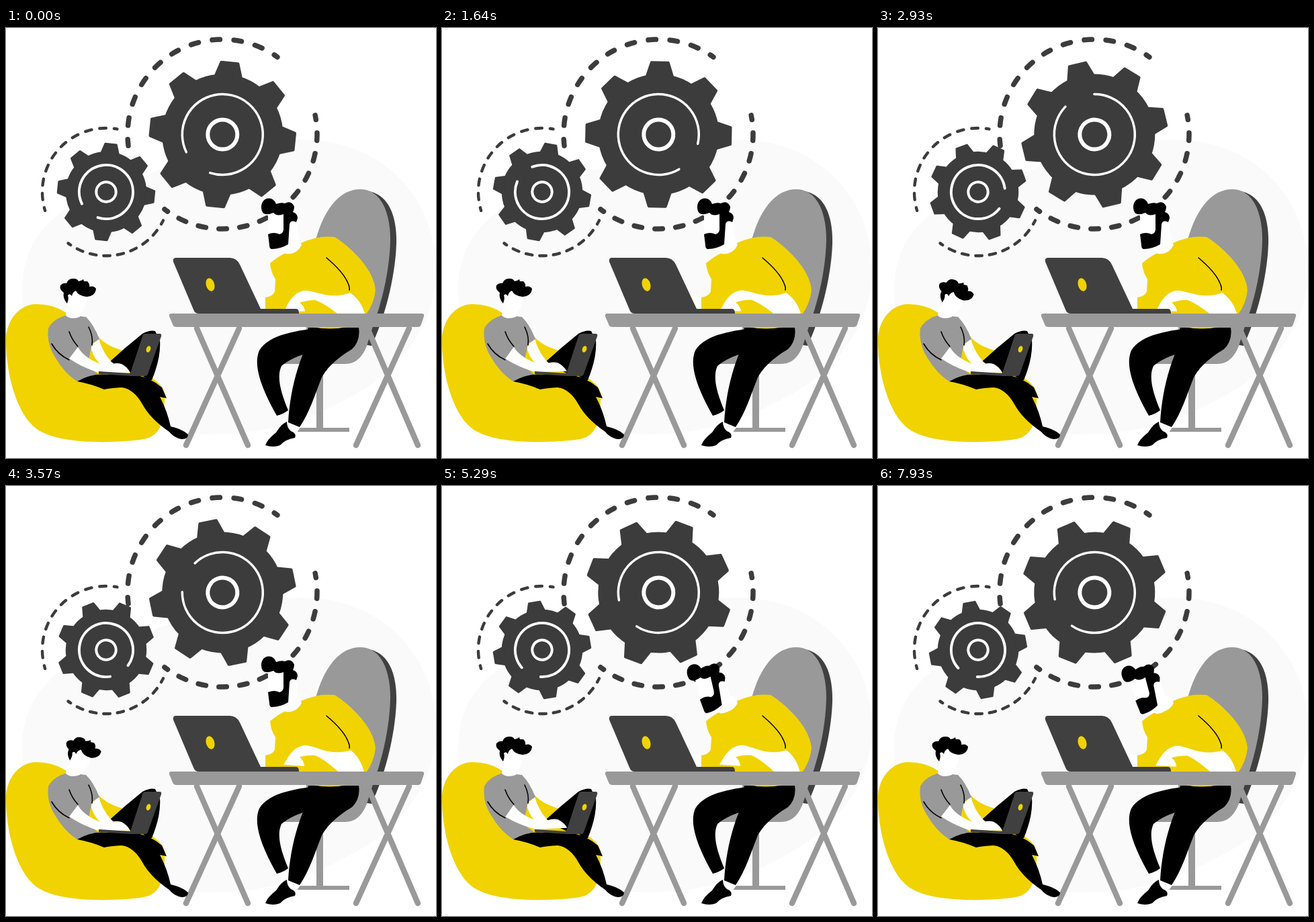
Recreate the animation shown at these times as an HTML page. Size 640x640 px, loop 8000 ms.

```html
<!DOCTYPE html>
<html lang="en">
<head>
<meta charset="utf-8">
<title>Two people at work</title>
<style>
  html, body { margin: 0; height: 100%; overflow: hidden; background: #fff; }
  svg { display: block; width: 100vw; height: 100vh; }
  .dark { fill: #3c3c3c; }
  .panel { fill: #404040; }
  .grey { fill: #999; }
  .yellow { fill: #f1d302; }
  .white { fill: #fff; }
  .line { fill: none; stroke: #000; stroke-width: 1.6; stroke-linecap: round; }
  .ring { fill: none; stroke: #3c3c3c; stroke-linecap: round; }
  .steel { fill: none; stroke: #999; stroke-width: 8.4; stroke-linecap: round; }
</style>
</head>
<body>
<svg viewBox="0 0 640 640">
  <path fill="#fafafa" d="M24 390C24 300 90 252 200 222C300 180 390 160 470 168C570 180 640 260 640 360C640 430 600 500 520 545C440 590 380 605 300 605C150 600 24 500 24 390Z"/>
  <g id="rings"></g>
  <g id="bigGear"></g>
  <g id="smallGear"></g>

  <g id="chair">
    <path class="panel" d="M535 242C570 246 582 280 581 322C579 375 562 435 544 473L526 470Z"/>
    <path class="grey" d="M452 370C458 290 488 240 527 240C560 240 572 278 572 315C571 370 554 430 535 470L455 470Z"/>
    <path class="grey" d="M447 444H546L538 470Q528 500 505 500H412Q420 486 447 484Z"/>
    <path class="steel" style="stroke-width:10;stroke-linecap:butt" d="M467 498V598"/>
    <path class="steel" style="stroke-width:6;stroke-linecap:butt" d="M432 598H511"/>
  </g>

  <g id="deskWorker">
    <path class="white" d="M403 574L420 569L424 590L440 592L432 603L416 596Z"/>
    <path d="M470 446C436 450 392 455 377 480C366 505 385 545 403 577Q412 575 420 569C410 545 402 520 410 503Q425 490 455 482Z"/>
    <path d="M450 446H525Q528 465 515 478C495 490 478 505 470 520C460 545 452 572 437 594L420 587C422 550 430 515 442 485Z"/>
    <path d="M386 621Q389 612 402 602Q410 589 418 586Q418 595 424 600Q433 603 430 610Q416 612 408 621Q398 625 386 621Z"/>
    <path class="white" d="M374 400Q382 399 388 404L392 420H376Z"/>
    <path class="yellow" d="M393 350Q405 340 416 335Q432 336 439 320Q465 308 489 311C506 321 547 355 550 390Q548 410 535 428H386V401Q398 399 400 392L401 374Q394 363 393 350Z"/>
    <path class="yellow" d="M452 444H512Q482 451 452 444Z"/>
    <g id="typingArm">
      <path class="white" d="M417 416Q428 392 446 391C464 392 482 405 512 394Q529 405 535 428H497Q473 409 460 405Q448 405 437 409Q444 414 445 422H414Z"/>
    </g>
    <path class="line" d="M477 342Q503 364 509 380Q512 386 511 390"/>
    <path class="white" d="M414 322Q413 332 416 336Q432 338 440 323L434 312Z"/>
    <g id="workerHead">
      <path class="white" d="M390 275L390 308L400 324L416 334Q430 337 439 322Q434 312 433 284L415 268Z"/>
      <path d="M380 268C379 251 398 249 402 262Q410 259 415 261Q425 256 429 266Q429 270 427 274Q434 276 434 283L432 289Q424 285 422 292L420 322Q408 329 396 329Q392 329 392 323L390 307Q399 303 407 307Q414 306 413 296L413 277Q403 281 398 275Q381 282 380 268Z"/>
    </g>
  </g>

  <g id="desk">
    <path class="steel" d="M284 447L360 621M347 447L268 621M538 447L613 621M600 447L521 621"/>
    <path class="grey" d="M246 425H619Q623 425 622 429L618 441Q617 445 613 445H254Q249 445 248 441L243 429Q242 425 246 425Z"/>
    <path class="panel" d="M253 342H333Q343 342 348 352L379 418H432Q436 418 436 425H287Q281 425 279 419L249 348Q248 342 253 342Z"/>
    <ellipse class="yellow" rx="6.2" ry="10" transform="translate(304 382) rotate(-16)"/>
  </g>

  <g id="loungeWorker">
    <path class="yellow" d="M0 465C0 435 20 411 45 411Q70 411 88 423L137 459Q150 475 182 482L205 515Q240 530 236 552C236 592 226 608 205 612C155 619 68 620 40 592C15 568 0 515 0 465Z"/>
    <path d="M154 497Q178 475 203 455Q214 449 222 451L229 465Q231 490 217 524Q210 525 203 517L186 514L165 504Z"/>
    <path class="white" d="M126 474L138 462Q143 482 157 497L168 506L150 508Q130 495 126 474Z"/>
    <path class="grey" d="M91 427Q70 433 63 447Q60 470 73 490Q87 514 106 526Q125 525 138 516L121 503L128 470L139 463Q131 442 119 430Z"/>
    <path d="M106 526Q128 513 150 516H190Q215 520 232 535L239 551L229 549Q240 570 245 593Q262 597 271 605Q271 612 262 612Q250 610 243 601Q215 582 203 560Q190 537 172 535Q155 536 146 538Q128 530 106 526Z"/>
    <g id="loungeArm">
      <path class="white" d="M94 492L107 475Q118 494 150 503Q162 497 172 500Q181 505 185 513H138Q113 505 94 492Z"/>
    </g>
    <path class="line" d="M68 470Q77 486 94 494M94 452Q98 464 107 474M123 445Q130 459 128 472"/>
    <path class="panel" d="M138 511L185 514L203 459Q204 455 208 455H229Q232 455 231 459L211 515Q209 519 205 518H186L138 515Z"/>
    <ellipse class="yellow" rx="3.2" ry="5" transform="translate(212 478) rotate(18)"/>
    <path class="white" d="M91 416L89 428Q96 435 110 430L108 420Z"/>
    <g id="loungeHead">
      <path class="white" d="M92 396Q93 412 90 424L109 427Q122 415 120 396L104 389Z"/>
      <path d="M86 394Q79 389 81 383Q85 379 90 380Q93 372 101 373Q106 373 108 377Q113 376 115 374L116 377L121 377Q125 381 124 385Q131 383 134 388Q133 399 120 400Q108 399 104 391Q99 393 98 399Q95 394 92 398Q94 402 91 410Q84 402 86 394Z"/>
    </g>
  </g>
</svg>
<script>
const LOOP = 8000, GEAR_TURN = 7150;
const byId = id => document.getElementById(id);

const polar = (cx, cy, r, deg) => {
  const a = deg * Math.PI / 180;
  return `${cx + r * Math.cos(a)} ${cy + r * Math.sin(a)}`;
};

// Counterclockwise arc on screen, from one angle down to a smaller one.
const arc = (cx, cy, r, from, to) =>
  `M${polar(cx, cy, r, from)}A${r} ${r} 0 ${from - to > 180 ? 1 : 0} 0 ${polar(cx, cy, r, to)}`;

const dashed = (d, width, dash, gap) =>
  `<path class="ring" d="${d}" stroke-width="${width}" stroke-dasharray="${dash} ${gap}" stroke-dashoffset="${dash / 2}"/>`;

byId('rings').innerHTML =
  dashed(arc(322, 158, 141, -54.5, -187), 7.5, 11.5, 20.7) +
  dashed(arc(322, 158, 141, 127.6, -11.5), 7.5, 11.5, 19.5) +
  dashed(arc(149, 244, 95, -80, -197), 4.4, 9.5, 12.05) +
  dashed(arc(149, 244, 95, 126.5, 26.5), 4.4, 9.5, 11);

function gear(arcWidth) {
  let teeth = '';
  for (let i = 0; i < 8; i++) {
    teeth += `<path d="M-19.5-85L-12.5-107H12.5L19.5-85Z" transform="rotate(${5.7 + i * 45})"/>`;
  }
  return `<g class="dark" stroke="#3c3c3c" stroke-width="4" stroke-linejoin="round">${teeth}<circle r="88"/></g>
    <g fill="none" stroke="#fff" stroke-linecap="round">
      <path d="${arc(0, 0, 60, 468, 154)}" stroke-width="${arcWidth}"/>
      <circle r="22" stroke-width="6"/>
    </g>`;
}
byId('bigGear').innerHTML = gear(3.5);
byId('smallGear').innerHTML = gear(6);

// Cubic bezier easing (.34, 0, .18, 1), solved by bisection.
function ease(p) {
  if (p <= 0) return 0;
  if (p >= 1) return 1;
  let lo = 0, hi = 1, u;
  for (let i = 0; i < 24; i++) {
    u = (lo + hi) / 2;
    const x = 3 * u * (1 - u) ** 2 * 0.34 + 3 * u * u * (1 - u) * 0.18 + u ** 3;
    if (x < p) lo = u; else hi = u;
  }
  return u * u * (3 - 2 * u);
}
const between = (t, start, end) => ease((t - start) / (end - start));
const wave = (t, period, phase = 0) => (1 - Math.cos(2 * Math.PI * (t / period + phase))) / 2;

const place = (id, transform) => byId(id).setAttribute('transform', transform);

function draw(t) {
  const turn = 360 * (ease(t / GEAR_TURN) - ease((t - GEAR_TURN) / GEAR_TURN));
  place('bigGear', `translate(322.3 158.5) rotate(${-turn})`);
  place('smallGear', `translate(149 244) scale(.668) rotate(${turn})`);

  place('workerHead', `rotate(${-15 * between(t, 4600, 5800)} 435 339)`);
  place('typingArm', `rotate(${4 * wave(t, 426.5, 0.05)} 522 405)`);

  const nod = between(t, 2250, 2900) - between(t, 3400, 4450);
  place('loungeHead', `rotate(${13 * nod} 100 430)`);
  place('loungeArm', `rotate(${-3 * wave(t, 710) ** 2} 100 484)`);
}

const begin = performance.now();
function frame() {
  draw((performance.now() - begin) % LOOP);
  requestAnimationFrame(frame);
}
frame();
</script>
</body>
</html>
```
